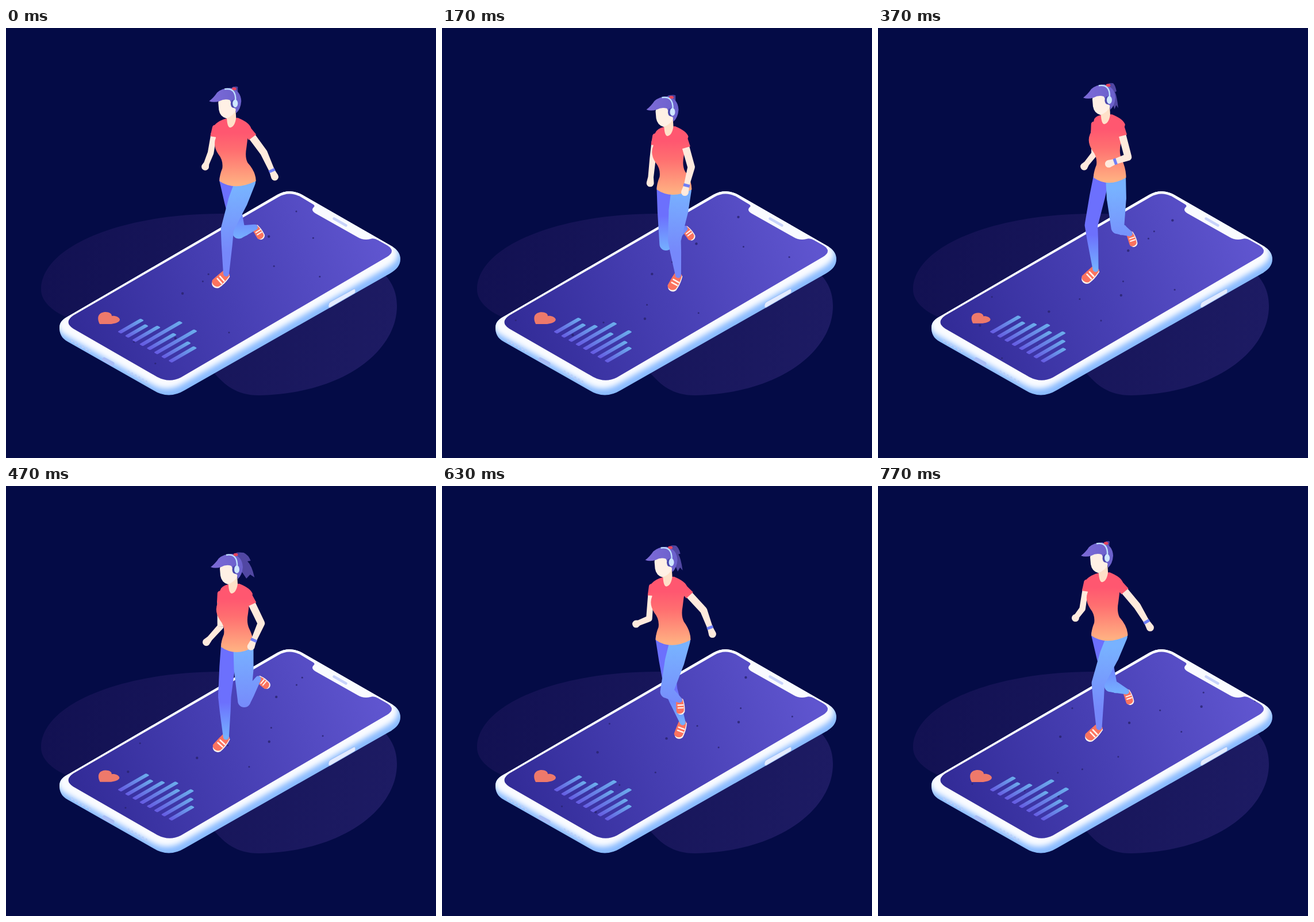
Recreate the animation shown at these times as an HTML page. Size 748 by 748 pixels, loop 0.81 s.

```html
<!DOCTYPE html>
<html lang="en">
<head>
<meta charset="utf-8">
<title>Running on a phone</title>
<style>
  html, body { margin: 0; width: 100%; height: 100%; overflow: hidden; background: #040b46; }
  svg { display: block; width: 100vw; height: 100vh; }
</style>
</head>
<body>
<svg viewBox="0 0 748 748">
  <defs>
    <linearGradient id="blobFill" gradientUnits="userSpaceOnUse" x1="60" y1="420" x2="680" y2="520">
      <stop stop-color="#121152"/><stop offset="1" stop-color="#1d1b63"/>
    </linearGradient>
    <linearGradient id="screenFill" gradientUnits="userSpaceOnUse" x1="120" y1="540" x2="640" y2="350">
      <stop stop-color="#322b97"/><stop offset=".5" stop-color="#473fb3"/><stop offset="1" stop-color="#5f55cf"/>
    </linearGradient>
    <linearGradient id="barFill">
      <stop stop-color="#655be2"/><stop offset="1" stop-color="#6baeec"/>
    </linearGradient>
    <linearGradient id="shirtFill" gradientUnits="userSpaceOnUse" x1="0" y1="180" x2="0" y2="270">
      <stop stop-color="#ff5770"/><stop offset=".35" stop-color="#ff6f70"/><stop offset="1" stop-color="#ffb182"/>
    </linearGradient>
    <linearGradient id="nearFill" gradientUnits="userSpaceOnUse" x1="0" y1="280" x2="0" y2="390">
      <stop stop-color="#78b2ff"/><stop offset="1" stop-color="#7688fb"/>
    </linearGradient>
    <linearGradient id="farFill" gradientUnits="userSpaceOnUse" x1="0" y1="340" x2="0" y2="400">
      <stop stop-color="#6c70fd"/><stop offset="1" stop-color="#75b0ff"/>
    </linearGradient>
    <linearGradient id="hairFill">
      <stop stop-color="#7d6bd8"/><stop offset="1" stop-color="#6a60cb"/>
    </linearGradient>
    <filter id="soft" x="-10%" y="-10%" width="120%" height="120%"><feGaussianBlur stdDeviation="5"/></filter>
    <path id="case" d="M104,504 L472,290 Q493,278 515,290 L670,379 Q686,388 686,402 C686,412 680,420 668,427 L311,630 Q283,647 256,630 L108,546 C96,540 93,530 93,522 C93,514 96,509 104,504Z"/>
    <path id="screen" d="M117,500 L474,294 Q493,283 513,294 L533,306 Q539,309 535,312 Q529,318 541,324 L612,364 Q622,370 634,367 Q640,365 647,369 L663,378 Q679,388 663,398 L304,608 Q284,618 263,607 L117,523 Q100,512 117,500Z"/>
    <clipPath id="inCase"><use href="#case"/></clipPath>
    <clipPath id="inScreen"><use href="#screen"/></clipPath>
    <g id="shoe">
      <path fill="#fff4f0" transform="translate(1.5 -1.8)" d="M-3,-6 C8,-9 16,-9 24,-8 C32,-5 32,6 25,8 C15,8 5,8 -2,7 C-5,4 -5,-3 -3,-6Z"/>
      <path fill="#fb735f" d="M-3,-6 C8,-9 16,-9 24,-8 C31,-5 31,6 25,8 C15,8 5,8 -2,7 C-5,4 -5,-3 -3,-6Z"/>
      <path d="M11,-7 L11,4 M17,-7 L17,4" stroke="#fff4f0" stroke-width="2.6" stroke-linecap="round"/>
    </g>
  </defs>

  <rect width="748" height="748" fill="#040b46"/>
  <path fill="url(#blobFill)" d="M61,455 C61,380 200,323 375,323 C520,322 600,380 650,420 C672,440 680,460 680,484 C680,560 590,636 440,639 C400,639 380,620 362,600 C300,560 240,540 105,503 C80,492 61,475 61,455Z"/>

  <use href="#case" fill="#8abbff"/>
  <g clip-path="url(#inCase)"><use href="#case" x="-4" y="-11" fill="#f9fbff" filter="url(#soft)"/></g>
  <path d="M100,508 L472,292 Q493,280 515,292 L672,382" fill="none" stroke="#f9fbff" stroke-width="5" clip-path="url(#inCase)"/>
  <path d="M171,576.5 L185,584" stroke="#a9bdf6" stroke-width="7" stroke-linecap="round"/>
  <path fill="#e3ebff" stroke="#9cbdf3" d="M565,476 L605,454 Q608,453 608,458 L607,461 L564,486 Q560,487 561,482 Q561,478 565,476Z"/>
  <g id="holes" fill="#b9cffa"></g>

  <use href="#screen" fill="url(#screenFill)"/>
  <path d="M570.5,331.5 L591.5,343.5" stroke="#c8d3fb" stroke-width="4.5" stroke-linecap="round"/>
  <g clip-path="url(#inScreen)"><g id="specks" fill="#29236f" opacity=".8"></g></g>
  <path id="heart" fill="#ee796b" d="M163,515 C160,510 159,503 162,499 C166,493 177,493 181,496 C184,498 184,500 184,501 C190,500 197,503 198,507 C198,512 190,514 183,515Z"/>
  <g id="bars" fill="url(#barFill)"></g>

  <path id="armFar" fill="#ffeadd"/>
  <g class="torso">
    <path id="sleeveFar" fill="url(#shirtFill)"/>
    <path id="pony" fill="#5147a3" d="M-3,-4 Q2,-5 10,-4 Q19,0 23,10 L17,11 Q25,18 30,39 L22,34 L15,41 L8,31 L-3,25Z"/>
  </g>
  <use id="shoeFar" href="#shoe"/>
  <path id="legFar" fill="url(#farFill)"/>
  <use id="shoeNear" href="#shoe"/>
  <path id="legNear" fill="url(#nearFill)"/>
  <g class="torso">
    <path id="shirt" fill="url(#shirtFill)"/>
    <path fill="#ffe0c8" d="M383,145 L400,138 L401,154 Q399,169 391,171 Q386,171 385,157Z"/>
    <path fill="#fff0e5" d="M370,128 Q370,120 378,117 L402,117 L402,139 Q396,151 384,155 Q373,152 371,140Z"/>
    <ellipse cx="401" cy="101.5" rx="3" ry="2" fill="#4a3f9c"/>
    <path fill="url(#hairFill)" d="M354,125 Q362,119 368,110 Q377,102 391,102 Q409,106 410,125 Q409,139 401,146 L400,138 Q392,136 393,128 Q391,126 390,123 Q381,120 372,125 Q362,128 354,125Z"/>
    <ellipse cx="397.5" cy="103.5" rx="4" ry="2.6" fill="#e5465f"/>
    <path d="M381,104 Q401,101 400,124" fill="none" stroke="#bfe2ff" stroke-width="2.4"/>
    <ellipse cx="396" cy="129.5" rx="4.5" ry="7" fill="#4b48ad"/>
    <ellipse cx="399.5" cy="129" rx="4.5" ry="6.8" fill="#cfe7ff"/>
  </g>
  <path id="armNear" fill="#ffeadd"/>
  <path id="watch" stroke="#707ff6" stroke-width="5"/>
  <g class="torso"><path id="sleeveNear" fill="url(#shirtFill)"/></g>
</svg>
<script>
const LOOP = 810, STEPS = 24;
const $ = id => document.getElementById(id);
const set = (el, attrs) => { for (const a in attrs) el.setAttribute(a, attrs[a]); return el; };
const add = (parent, tag, attrs) =>
  parent.appendChild(set(document.createElementNS('http://www.w3.org/2000/svg', tag), attrs));

// A cosine that peaks at the given step, n times per stride.
const wave = (k, peak, n = 1) => Math.cos((k - peak) * n / STEPS * 2 * Math.PI);
// Mean, then size and peak of the stride swing and of the double-time swing.
const swing = (k, mean, a, p, b = 0, q = 0) => mean + a * wave(k, p) + b * wave(k, q, 2);

const leg = k => ({
  knee: [swing(k, 401.4, 17, 10.7, 2.5, 3.3), swing(k, 358.7, 3.9, 14.8, 17.7, 3.7)],
  ankle: [swing(k, 415.4, 28, 12.2, 4.5, 5.7), swing(k, 389, 51, 2.5, 3, 7.7)],
  angle: swing(k, 95, 46, 2, 12.6, 9.5)
});

// Both arms are measured from the torso; the hand or wrist from the elbow.
const nearArm = k => ({
  elbow: [swing(k, 442, 14, 20), swing(k, 220.5, 9, 9)],
  reach: [swing(k, -3, 20, 22), swing(k, 26, 10, 22, 12, 3.5)]
});
const farArm = k => ({
  elbow: [swing(k, 365, 8.5, 11), swing(k, 220, 10, 16)],
  reach: [swing(k, -15, -11, 16), swing(k, 25, 12, 6, 10, 15.2)]
});

const plus = (a, b) => [a[0] + b[0], a[1] + b[1]];
const mix = (a, b, t) => [a[0] + (b[0] - a[0]) * t, a[1] + (b[1] - a[1]) * t];
const heading = (a, b) => {
  const l = Math.hypot(b[0] - a[0], b[1] - a[1]) || 1;
  return [(b[0] - a[0]) / l, (b[1] - a[1]) / l];
};

// Strip from a to b that tapers between two half widths.
function taper(a, b, r1, r2) {
  const [c, s] = heading(a, b);
  return `M${a[0] - s * r1},${a[1] + c * r1}L${b[0] - s * r2},${b[1] + c * r2}` +
         `L${b[0] + s * r2},${b[1] - c * r2}L${a[0] + s * r1},${a[1] - c * r1}Z`;
}
const disc = ([x, y], r) => `M${x - r},${y}a${r},${r} 0 1 0 ${2 * r},0a${r},${r} 0 1 0 ${-2 * r},0Z`;

// Outline of a chain of [point, radius] joints.
const limb = (...joints) => joints.map(([p, r], i) => {
  const next = joints[i + 1];
  return disc(p, r) + (next ? taper(p, next[0], r, next[1]) : '');
}).join('');

function sleeve(from, elbow, length, r1, r2) {
  const [c, s] = heading(from, elbow);
  return disc(from, r1) + taper(from, plus(from, [c * length, s * length]), r1, r2);
}

function drawLeg(side, hip, thigh, { knee, ankle, angle }) {
  set($('leg' + side), {
    d: limb([hip, thigh], [mix(hip, knee, .42), thigh - .5], [knee, 11.3], [mix(knee, ankle, .35), 9.5], [ankle, 5])
  });
  const size = .78 + .22 * Math.min(1, Math.max(0, (angle - 80) / 45));
  set($('shoe' + side), { transform: `translate(${ankle}) rotate(${angle}) scale(${size})` });
}

for (let i = 0; i < 12; i++) {
  const n = i % 6;
  add($('holes'), 'ellipse', { cx: (i > 5 ? 213 : 115) + n * 6.2, cy: (i > 5 ? 598 : 544) + n * 3.5, rx: 1.9, ry: 2.6 });
}

// Specks strewn over a strip of ground longer than the screen.
let seed = 7;
const random = () => (seed = seed * 16807 % 2147483647) / 2147483647;
for (let i = 0; i < 24; i++) {
  const along = -320 + i * 32 + random() * 20, across = random() * 200;
  add($('specks'), 'circle', {
    cx: 104 + (along + across) * .866, cy: 512 + (across - along) * .5, r: i % 3 ? 1.5 : 2.2
  });
}

const bars = [45, 40, 48, 66, 50, 67, 49, 42].map((reach, i) => ({
  reach,
  size: 5 - i * .4,
  peak: i > 1 && i % 2 ? 0 : 12.5,
  el: add($('bars'), 'rect', {
    height: 7, rx: 2, transform: `matrix(.866 -.5 .866 .5 ${194 + i * 12.6} ${528.3 + i * 7.2})`
  })
}));

const torso = document.querySelectorAll('.torso');

function draw(k) {
  set($('specks'), { transform: `translate(${k * 11.65} ${k * -6.78})` });
  const beat = 1 - .14 * Math.max(0, wave(k, 10)) ** 2;
  set($('heart'), { transform: `translate(179 505) scale(${beat}) translate(-179 -505)` });
  for (const b of bars) set(b.el, { width: (b.reach + b.size * wave(k, b.peak)) / .866 });

  const shift = [swing(k, 1, 2, 10), 6.6 + 14 * wave(k, 15.6, 2)];
  const turn = swing(k, 4, 4.5, 10);
  const hem = swing(k, 432, 3.5, 0);
  const tail = wave(k, 15.3);
  torso.forEach(g => set(g, { transform: `translate(${shift})` }));
  set($('pony'), { transform: `translate(402 104) scale(${tail} 1)` });
  set($('shirt'), {
    d: `M385,155 Q372,158 ${364 + turn},166 Q${363 + turn},180 366,188 Q360,202 370,217 Q379,228 377,242` +
       `Q372,254 372,264 Q398,282 ${hem},264 Q${hem},248 421,232 Q416,222 419,206 L421,190 L427,172 Q424,162 404,154Z`
  });

  const far = farArm(k), farShoulder = [364 + turn, 171];
  const farElbow = plus(far.elbow, shift), farHand = plus(farElbow, far.reach);
  set($('armFar'), {
    d: limb([mix(plus(farShoulder, shift), farElbow, .25), 5], [farElbow, 5.3], [mix(farElbow, farHand, .75), 4.8], [farHand, 6.5])
  });
  set($('sleeveFar'), { d: sleeve(farShoulder, far.elbow, 16, 4.5, 5.5) });

  const near = nearArm(k), nearShoulder = [417, 171];
  const elbow = plus(near.elbow, shift), wrist = plus(elbow, near.reach);
  const [c, s] = heading(elbow, wrist);
  set($('armNear'), {
    d: limb([mix(plus(nearShoulder, shift), elbow, .3), 6.5], [elbow, 6.3], [wrist, 4.8], [plus(wrist, [c * 12, s * 12]), 6.5])
  });
  set($('watch'), { d: `M${wrist[0] - s * 5.5},${wrist[1] + c * 5.5}L${wrist[0] + s * 5.5},${wrist[1] - c * 5.5}` });
  set($('sleeveNear'), { d: sleeve(nearShoulder, near.elbow, 21, 7, 8) });

  // The far leg runs half a stride later, a little to the left.
  const nearLeg = leg(k), farLeg = leg(k + STEPS / 2);
  farLeg.knee[0] -= 12;
  farLeg.ankle[0] -= 6;
  const low = Math.max(farLeg.knee[1] + 11, farLeg.ankle[1]);
  set($('farFill'), { y1: low - 60, y2: low });
  drawLeg('Far', plus([386, 262], shift), 14, farLeg);
  drawLeg('Near', plus([hem - 18, 264], shift), 17.5, nearLeg);
}

const start = performance.now();
function tick() {
  const t = (performance.now() - start) % LOOP;
  // 30 steps a second, on a 10 ms clock
  draw(Math.min(STEPS - 1, Math.floor((Math.floor(t / 10) + .5) * .3)));
  requestAnimationFrame(tick);
}
tick();
</script>
</body>
</html>
```
